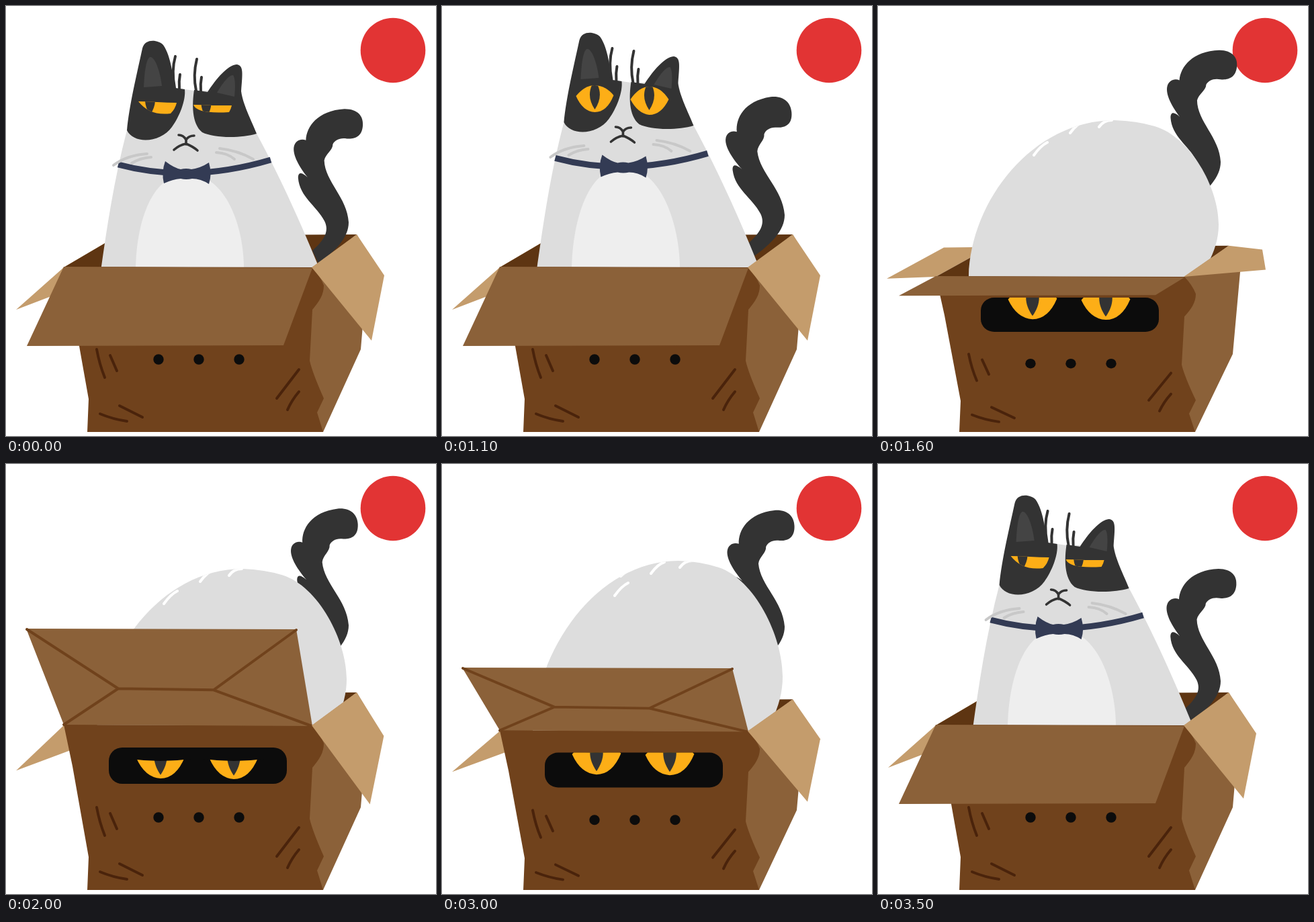
An HTML page with a canvas that plays this animation: 640x640 px, repeating every 3.6 s.

```html
<!DOCTYPE html>
<html lang="en">
<head>
<meta charset="utf-8">
<title>Cat in a box</title>
<style>
html, body { margin: 0; height: 100%; overflow: hidden; background: #fff; }
canvas { display: block; width: 100vw; height: 100vh; }
</style>
</head>
<body>
<canvas id="stage" width="640" height="640"></canvas>
<script>
const ctx = document.getElementById('stage').getContext('2d');
const LOOP = 3600, STEP = 100;
const DARK = '#333', GREY = '#ddd', AMBER = '#fdae17', NAVY = '#333b54', BLACK = '#0c0c0c';
const FRONT = '#70421c', SIDE = '#8b6139', TAN = '#c49c6c', INSIDE = '#5e3512', SCRATCH = '#4a230b';

const fill = (d, color) => { ctx.fillStyle = color; ctx.fill(new Path2D(d)); };
const line = (d, color, width) => {
  ctx.strokeStyle = color;
  ctx.lineWidth = width;
  ctx.stroke(new Path2D(d));
};
const dot = (x, y, r, color) => {
  ctx.fillStyle = color;
  ctx.beginPath();
  ctx.arc(x, y, r, 0, 7);
  ctx.fill();
};
const group = draw => { ctx.save(); draw(); ctx.restore(); };

// Blend two paths of the same structure
const mix = (a, b, k) => {
  const to = b.match(/-?\d+/g);
  let i = 0;
  return a.replace(/-?\d+/g, n => +n + (to[i++] - n) * k);
};

// Value at t from alternating times and values
const track = (...keys) => t => {
  if (t <= keys[0]) return keys[1];
  for (let i = 2; i < keys.length; i += 2) {
    if (t <= keys[i]) {
      const k = (t - keys[i - 2]) / (keys[i] - keys[i - 2]);
      return keys[i - 1] + (keys[i + 1] - keys[i - 1]) * k;
    }
  }
  return keys[keys.length - 1];
};

const headY = track(700, 0, 1000, -5, 1100, -12, 1200, -34, 1300, -40, 1400, 110, 1500, 360,
  3100, 360, 3200, 90, 3300, -40, 3400, -18, 3500, -5, 3600, 0);
const tailY = track(700, 0, 1100, -11, 1300, -35, 1400, -50, 1500, -80, 1600, -90, 1700, -84,
  2000, -82, 3000, -80, 3100, -45, 3200, -20, 3300, -20, 3400, -6, 3500, 1, 3600, 0);
const rumpTop = track(1400, 400, 1500, 250, 1600, 170, 2000, 156, 2400, 143, 3000, 144, 3100, 240, 3200, 400);
const furX = track(1600, 0, 2400, 6, 3000, 25);
const squash = track(1300, 1, 1400, .99, 1500, .96, 1600, .943, 1700, .975, 1800, 1,
  2700, 1, 3000, .965, 3100, .95, 3200, 1);
const sideLift = track(1300, 0, 1400, .1, 1500, .6, 1600, 1, 1700, .6, 1800, .1, 1900, -.12, 2000, -.07, 2300, 0);
const flapRise = track(1300, -117, 1400, -105, 1500, -75, 1600, -30, 1700, 90, 1800, 148,
  2000, 144, 2400, 120, 3000, 98, 3100, 20, 3200, -90, 3300, -117);
const awake = track(700, 0, 900, 1, 3000, 1, 3200, 0);
const lidY = track(1700, 420, 2000, 440, 2400, 464, 2500, 464, 2800, 420);
const peekY = track(1600, 430, 2000, 442, 2500, 442, 2900, 430);
const sway = t => .45 + .55 * Math.cos(2 * Math.PI * (t - 690) / 1800);

const TAIL = 'M456 364 C478 345 480 332 474 320 C462 297 437 284 435 256 C435 247 440 247 449 255' +
  ' C437 240 427 222 429 210 C431 200 440 197 447 200 C448 180 465 156 505 154 C525 154 533 165 532 178' +
  ' C531 195 520 199 508 198 C498 196 490 200 487 206 C487 215 476 220 474 230' +
  ' C475 262 508 285 510 322 C510 345 490 365 465 383 Z';
const LEFT_EYE = 'M198 146 Q211 130 226 130 Q243 131 254 145 Q244 170 226 170 Q208 169 198 146';
const LEFT_SQUINT = 'M197 142 Q212 142 225 143 Q240 144 254 144 Q252 153 245 160 Q214 164 197 142';
const RIGHT_EYE = 'M279 151 Q292 132 307 132 Q324 132 336 151 Q325 174 307 174 Q290 172 279 151';
const RIGHT_SQUINT = 'M279 147 Q295 147 308 148 Q322 148 336 148 Q335 153 332 158 Q284 161 279 147';

function eye(shape, x, y) {
  fill(shape, AMBER);
  group(() => {
    ctx.clip(new Path2D(shape));
    ctx.translate(x, y);
    fill('M-4 -21 C-10 -8 -8 4 0 16 C8 4 10 -8 4 -21 Z', DARK);
  });
}

function tail(t) {
  const bend = sway(t);
  const d = TAIL.replace(/(\d+) (\d+)/g, (_, px, py) => {
    const x = px - 509, y = py - 322;
    if (y >= 0) return `${px} ${py}`;
    const a = bend * .157 * -y / 147, c = Math.cos(a), s = Math.sin(a);
    return `${509 + x * c + y * s} ${322 + (y * c - x * s) * (1 + .1 * bend)}`;
  });
  ctx.translate(0, tailY(t));
  fill(d, DARK);
}

function head(t) {
  fill('M180 185 C183 150 195 100 203 63 C207 48 226 50 234 58 C246 75 248 105 252 122 L266 124' +
    ' C268 140 258 165 247 180 C230 204 190 206 180 185 Z', DARK);
  fill('M280 125 L300 128 C313 108 330 88 343 87 C354 88 352 100 350 127' +
    ' C352 145 365 170 373 190 C350 197 310 197 292 188 C276 175 277 145 280 125 Z', DARK);
  fill('M205 121 C206 100 208 80 214 76 C222 74 230 100 232 119 Z', '#444');
  fill('M314 129 C322 115 332 102 338 103 C342 108 341 125 340 135 Z', '#444');
  line('M252 75 Q246 96 251 122 M259 102 Q257 112 258 123 M284 79 Q278 103 283 126 M291 106 Q289 116 290 127', DARK, 4);

  const k = awake(t);
  eye(mix(LEFT_SQUINT, LEFT_EYE, k), 214.5 + 11.5 * k, 146 + 4 * k);
  eye(mix(RIGHT_SQUINT, RIGHT_EYE, k), 298 + 9 * k, 150 + k);

  line('M257 192 Q264 192 268 199 Q272 193 280 193 M268 199 V206 M250 214 Q258 207 268 205 Q278 209 285 215', DARK, 3.6);
  line('M160 237 Q180 222 210 220 M187 234 Q200 226 216 225 M318 212 Q345 215 368 228 M313 218 Q330 219 340 228', '#c8c8c8', 4);
}

function sittingCat(t) {
  const y = headY(t), chest = y * .8, x = Math.max(0, -y) * .12;
  ctx.beginPath();
  ctx.rect(0, 0, 640, 395);
  ctx.clip();
  group(() => {
    ctx.translate(x, y);
    fill('M133 450 C145 370 155 280 180 185 L215 110 L252 122 L280 126 L350 126 Q355 155 373 190' +
      ' C400 240 440 320 490 450 Z', GREY);
  });
  const top = 250 + chest;
  fill(`M193 390 C194 330 213 ${top} 270 ${top} C328 ${top} 354 330 354 390 Z`, '#eee');
  group(() => {
    ctx.translate(x, chest);
    ctx.lineCap = 'butt';
    line('M167 236 Q215 249 268 249 Q330 248 394 229', NAVY, 9);
    fill('M237 231 Q250 241 260 243 Q268 241 276 243 Q290 241 302 233 Q307 250 302 265 Q290 257 277 257' +
      ' Q268 259 260 257 Q248 258 235 264 Q231 247 237 231 Z', NAVY);
  });
  ctx.translate(x, y);
  head(t);
}

function rump(t) {
  const top = rumpTop(t), k = (400 - top) / 230;
  if (k <= 0) return;
  const shape = new Path2D();
  shape.addPath(new Path2D('M135 402 C138 290 230 170 352 170 Q385 171 412 179 C465 195 507 270 507 325' +
    ' Q507 355 490 385 L480 410 L135 410 Z'), new DOMMatrix([1, 0, 0, k, 0, 400 * (1 - k)]));
  ctx.fillStyle = GREY;
  ctx.fill(shape);
  ctx.clip(shape);
  ctx.translate(furX(t), top - 170);
  line('M232 222 Q242 208 252 203 M286 189 Q296 175 306 172 M329 180 Q336 170 348 170 M241 193 l6 -5', '#fff', 4);
}

function slot(t) {
  ctx.beginPath();
  ctx.roundRect(153, 422, 265, 54, 20);
  ctx.fillStyle = BLACK;
  ctx.fill();
  ctx.clip();
  const lid = lidY(t);
  for (const [x, dy] of [[230, 0], [339, 1]]) {
    group(() => {
      ctx.translate(x, peekY(t) + dy);
      ctx.scale(1.3, 1.3);
      ctx.translate(-226, -150);
      eye(LEFT_EYE, 226, 150);
    });
    fill(`M${x - 45} 400 V${lid - 1} Q${x} ${lid + 5} ${x + 45} ${lid - 1} V400 Z`, BLACK);
  }
}

function boxBack(t) {
  fill(mix('M86 389 L15 452 L130 408 L166 342 Z', 'M86 389 L13 392 L98 343 L166 342 Z', sideLift(t)), TAN);
  fill('M86 389 L166 342 L522 340 L456 392 Z', INSIDE);
}

function boxFront(t) {
  fill('M456 389 L522 340 L540 370 L528 511 L472 634 L440 634 L440 400 Z', SIDE);
  fill('M86 388 L99 450 L123 585 L121 634 H472 L463 605 L473 584 Q456 546 452 528 L456 452' +
    ' C466 440 473 430 473 416 Q468 402 456 389 Z', FRONT);
  for (const x of [227, 287, 347]) dot(x, 526, 7.7, BLACK);
  line('M135 511 Q139 533 147 553 M155 520 L165 543 M140 607 Q159 615 180 618 M169 595 L203 612' +
    ' M436 541 L403 584 M436 574 Q425 587 419 601', SCRATCH, 4);
  group(() => slot(t));

  const h = flapRise(t), up = h > 0, rim = 389 - h, fold = 389 - .38 * h;
  const right = up ? 432 : 413;
  fill(`M86 388 L${up ? 30 : 31} ${rim} L${right} ${rim + (up ? 1 : -1)} L456 390 Z`, SIDE);
  if (up) {
    line(`M86 388 L167 ${fold} L309 ${fold + 2} L455 390 M31 ${rim + 1} L167 ${fold} M432 ${rim + 2} L309 ${fold + 2}`, FRONT, 4);
  }
  fill(mix('M455 389 L522 340 L563 401 L544 498 Z', 'M455 389 L522 340 L572 346 L577 378 Z', sideLift(t)), TAN);
}

function inBox(draw, t) {
  group(() => {
    const s = squash(t);
    ctx.transform(1, 0, 0, s, 0, 634 * (1 - s));
    draw(t);
  });
}

function render() {
  const t = Math.floor(performance.now() % LOOP / STEP) * STEP;
  ctx.fillStyle = '#fff';
  ctx.fillRect(0, 0, 640, 640);
  ctx.lineCap = ctx.lineJoin = 'round';
  dot(576, 66, 48.3, '#e23434');
  inBox(boxBack, t);
  for (const part of [tail, sittingCat, rump]) group(() => part(t));
  inBox(boxFront, t);
  requestAnimationFrame(render);
}
render();
</script>
</body>
</html>
```
